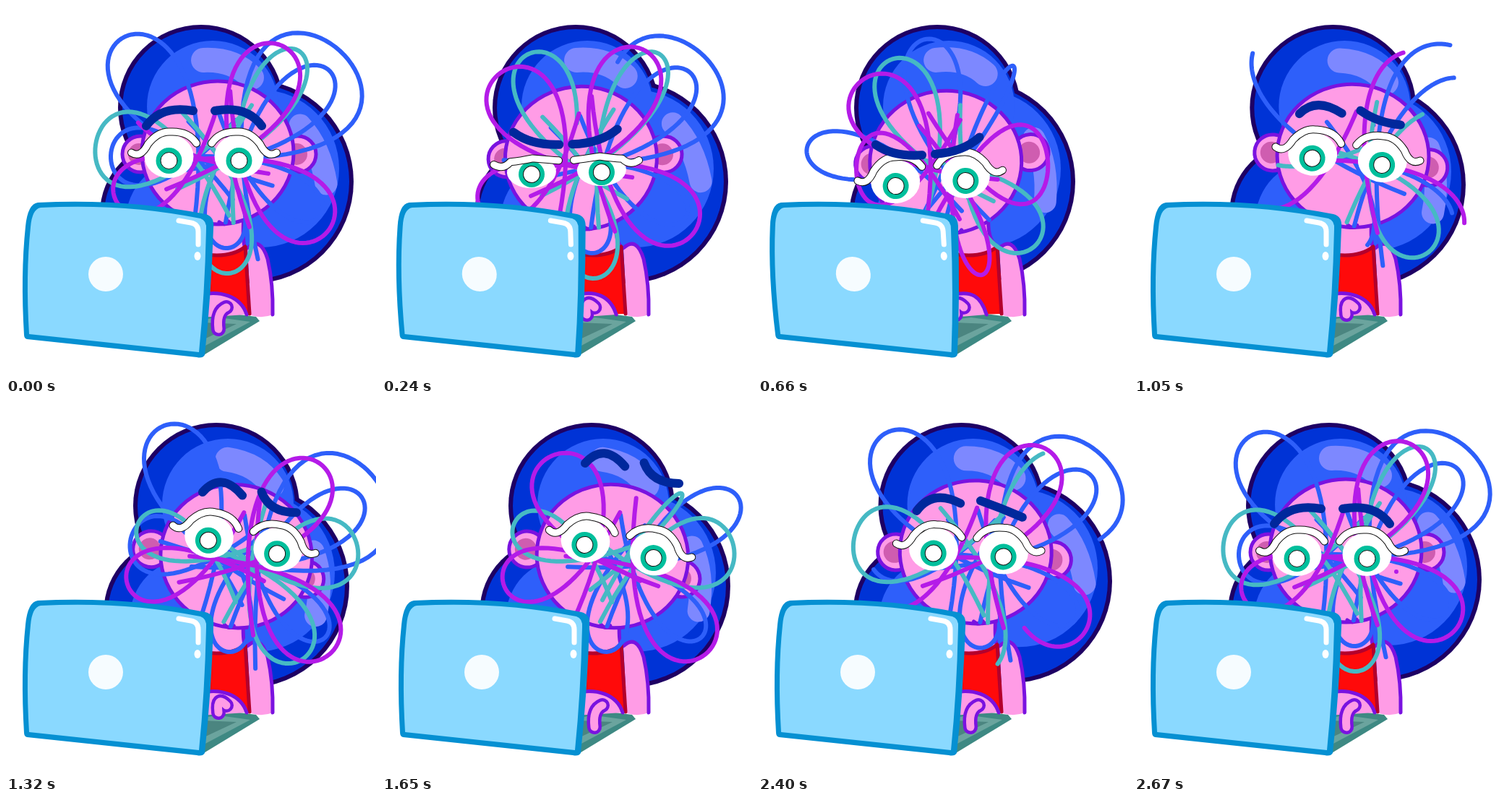
An HTML page with a canvas for the animation above (2700 ms loop, 512 by 512 pixels).

```html
<!DOCTYPE html>
<html lang="en">
<head>
<meta charset="utf-8">
<title>Tangled thoughts at the laptop</title>
<style>
  html, body { margin: 0; width: 100%; height: 100%; overflow: hidden; background: #fff; }
  canvas { display: block; width: 512px; height: 512px; }
</style>
</head>
<body>
<canvas id="stage" width="512" height="512"></canvas>
<script>
const ctx = document.getElementById('stage').getContext('2d');
const LOOP = 2700, STEP = 30, TRIM = 130;
const TIMES = [0, 240, 660, 1320, 1650, 2130, 2670];
const BLUE = '#2e5ffa', PURPLE = '#b41be8', TEAL = '#46b9c4';
const INK = '#7a12e0', SKIN = '#ff9ce6', NAVY = '#00289c';

// Monotone cubic through one value per pose; the loop closes on the first pose.
function track(...poses) {
  const v = [...poses, poses[0]];
  const slope = i => (v[i + 1] - v[i]) / (TIMES[i + 1] - TIMES[i]);
  const tangent = i => {
    if (i === 0 || i === v.length - 1) return 0;
    const a = slope(i - 1), b = slope(i);
    return a * b <= 0 ? 0 : 2 * a * b / (a + b);
  };
  return t => {
    if (t >= TIMES[6]) return v[6];
    let i = 0;
    while (t >= TIMES[i + 1]) i++;
    const h = TIMES[i + 1] - TIMES[i], u = (t - TIMES[i]) / h, w = 1 - u;
    return v[i] * (1 + 2 * u) * w * w + tangent(i) * h * u * w * w
      + v[i + 1] * u * u * (3 - 2 * u) - tangent(i + 1) * h * u * u * w;
  };
}

// The gaze leads; the rest of the body follows it.
const motion = {
  x: track(0, -18.5, -35, 53.5, 54, 40),
  y: track(0, 17.5, 31.5, -16, -10, -10),
  turn: track(0, -1.7, -4.2, 11, 10.8, 7),
  bun: track(0, -2, -22, 21, 20, 23),
  mane: track(0, -2, -42, -6, 1, 18),
  squint: track(0, 1, 0, 0, 0, 0),
  angry: track(0, 1, 1, 0, 0, 0),
  worry: track(0, 0, 0, 1, 1, 1),
  lift: track(0, 0, 0, 0, 47, 5),
  tap: track(1, 0, 0, 0, 1, 1)
};
function poseAt(t) {
  const p = { t };
  for (const key in motion) p[key] = motion[key](t);
  p.headX = 293 + p.x * (p.x < 0 ? 0.95 : 0.48);
  p.headY = 203 + 0.42 * Math.max(0, p.y) + 0.7 * Math.max(0, p.turn);
  p.lean = 0.32 * Math.min(0, p.x);
  return p;
}

function paint(path, fill, stroke, width = 5) {
  const p = typeof path === 'string' ? new Path2D(path) : path;
  if (fill) { ctx.fillStyle = fill; ctx.fill(p); }
  if (stroke) { ctx.strokeStyle = stroke; ctx.lineWidth = width; ctx.stroke(p); }
}
function oval(x, y, rx, ry, ...style) {
  const p = new Path2D();
  p.ellipse(x, y, rx, ry, 0, 0, Math.PI * 2);
  paint(p, ...style);
}
const disc = (x, y, r, ...style) => oval(x, y, r, r, ...style);
function group(x, y, deg, draw) {
  ctx.save();
  ctx.translate(x, y);
  ctx.rotate(deg * Math.PI / 180);
  draw();
  ctx.restore();
}

// A loop of thread: it crosses itself near the middle of the head and bulges out to its tip.
// It is drawn in from its start time and wiped away before its end, which may pass the loop's end.
const loops = [];
const loop = (color, tipX, tipY, width, ...spans) => loops.push({ color, tipX, tipY, width, spans });

loop(BLUE, -133, -158, 48, [2200, 2850], [1000, 1480]);
loop(BLUE, 169, -141, 80, [2300, 3040], [1000, 1580]);
loop(BLUE, 155, -113, 36, [1000, 3120]);
loop(BLUE, -148, 4, 40, [2350, 2880], [1050, 1530]);
loop(BLUE, 14, 132, 28, [1000, 3150]);
loop(BLUE, 142, 87, 28, [1000, 3170]);
loop(BLUE, -190, -34, 32, [450, 980], [1850, 2350]);
loop(BLUE, -14, -172, 38, [440, 930], [1860, 2330]);
loop(BLUE, -100, -119, 25, [1830, 2330]);
loop(BLUE, 103, -126, 10, [480, 940]);

loop(TEAL, -169, -11, 52, [1980, 2860]);
loop(TEAL, 112, -141, 33, [2350, 3100]);
loop(TEAL, 15, 167, 36, [2350, 3110]);
loop(TEAL, -66, -147, 40, [130, 950]);
loop(TEAL, 114, 125, 40, [450, 1580]);
loop(TEAL, 162, -45, 48, [1020, 2330]);
loop(TEAL, -142, -19, 32, [1020, 1820]);
loop(TEAL, 78, -103, 8, [1480, 2320]);

loop(PURPLE, -108, -121, 47, [1480, 1950], [2670, 3640]);
loop(PURPLE, 89, -148, 46, [1880, 3140], [1000, 1500]);
loop(PURPLE, 152, 109, 46, [1000, 1890], [2300, 3160]);
loop(PURPLE, -141, 66, 36, [1000, 1850], [2350, 3150]);
loop(PURPLE, 141, 12, 55, [450, 980], [1870, 2400]);
loop(PURPLE, -124, 0, 50, [450, 980], [1860, 2400]);
loop(PURPLE, 39, 159, 20, [480, 970]);

function drawLoop({ color, tipX, tipY, width }, from, to) {
  const knotX = 0.2 * tipX, knotY = 8;
  const dx = tipX - knotX, dy = tipY - knotY, reach = Math.hypot(dx, dy);
  ctx.beginPath();
  for (let i = 0; i <= 60; i++) {
    const s = 1.2 * (2 * (from + (to - from) * i / 60) - 1);
    const out = 1 - s * s, across = width * (s - s ** 3) / 0.385 / reach;
    ctx.lineTo(knotX + dx * out - dy * across, knotY + dy * out + dx * across);
  }
  ctx.strokeStyle = color;
  ctx.lineWidth = 6;
  ctx.stroke();
}

function drawTangle(p) {
  group(p.headX, p.headY, p.turn, () => {
    for (const l of loops) {
      for (const [begin, end] of l.spans) {
        const age = (p.t - begin + LOOP) % LOOP, left = end - begin - age;
        if (left > 0) drawLoop(l, Math.max(0, 1 - left / TRIM), Math.min(1, age / TRIM));
      }
    }
  });
}

function drawHair(p) {
  const bx = 270 + p.bun, by = 141;
  const mx = 340 + p.mane, my = 243 + 0.8 * Math.max(0, p.turn);
  const blobs = [[230 + 0.1 * p.x, 287, 100], [mx, my, 141], [bx, by, 115]];
  for (const [x, y, r] of blobs) disc(x, y, r, '#1e0064');
  for (const [x, y, r] of blobs) disc(x, y, r - 6, '#0033d6');
  disc(blobs[0][0] + 20, 297, 84, BLUE);
  disc(mx + 12, my - 18, 109, BLUE);
  disc(bx + 16, by - 2, 91, BLUE);
  group(bx, by, p.turn, () => paint('M3-66Q45-68 70-42', null, '#7d88ff', 34));
  group(mx, my, 1.7 * p.turn - 0.5 * p.mane, () => paint('M67-78Q95-48 103 3', null, '#7d88ff', 31));
}

function drawBody(p) {
  const nape = 329 + 0.9 * p.lean;
  paint(`M270 290L${nape} 290Q${nape - 2} 322 331 334L310 352 270 345Z`, SKIN);
  paint(`M${nape} 290Q${nape - 2} 322 330 332`, null, INK);
  const arm = 'M334 335Q352 318 362 350Q370 385 369 427';
  paint(arm + 'Q355 433 339 428Z', SKIN);
  paint(arm, null, INK);
  const shirt = 'M270 343Q310 350 331 333Q334 380 337 426';
  paint(shirt + 'L270 428Z', '#ff0a0a');
  paint(shirt, null, '#b4002c');
}

function drawHead(p) {
  group(p.headX, p.headY, p.turn, () => {
    for (const side of [-1, 1]) {
      const x = 2 + 109 * side - 0.2 * p.x, y = 2 + 0.2 * p.x;
      disc(x, y, 25, SKIN, INK);
      disc(x - 2, y, 15, '#cf5db0');
    }
    oval(0, 0, 105, 99, SKIN, INK);
    paint('M2 96Q10 102 15 95', null, INK);
  });
}

const mix = (a, b, k) => a.map((v, i) => v + (b[i] - v) * k);
const mirror = shape => shape.map((v, i) => i % 2 ? v : -v);
const quad = ([ax, ay, cx, cy, bx, by]) => `M${ax} ${ay}Q${cx} ${cy} ${bx} ${by}`;
const CALM = [-80, -48, -59, -77, -15, -69];
const ANGRY = [-72, -59, -48, -40, -9, -40];
const ARCHED = [-69, -64, -49, -98, -14, -70];
const CUPPED = [11, -80, 27, -54, 64, -61];

function drawEyes(p) {
  const k = p.squint, top = -49 + 22 * k, edge = -11 - 4 * k;
  const lash = `M-52 ${edge}Q-39 ${edge + 8} -29 ${-23 + 5 * k}Q-15 ${top + 8} 2 ${-40 + 18 * k}Q27 ${top + 8} 38 ${-24 + 6 * k}`;
  group(274 + p.x, 214 + p.y, p.turn, () => {
    for (const flip of [1, -1]) {
      ctx.save();
      ctx.scale(flip, 1);
      ctx.translate(-48.5, 0);
      oval(0, -6 + 3 * k, 34, 30 - 8 * k, '#fff');
      disc(0, 0, 18, '#00bf9c');
      disc(0, 0, 11.5, '#fff', '#111', 1);
      paint(lash, null, '#111', 11);
      paint(lash, null, '#fff', 9);
      ctx.restore();
    }
    ctx.translate(0, -p.lift);
    const frown = mix(CALM, ANGRY, p.angry);
    paint(quad(mix(frown, ARCHED, p.worry)), null, NAVY, 12);
    // The right brow runs from the nose outwards once mirrored and reversed.
    const [ax, ay, cx, cy, bx, by] = mirror(frown);
    paint(quad(mix([bx, by, cx, cy, ax, ay], CUPPED, p.worry)), null, NAVY, 12);
  });
}

function drawDesk(p) {
  paint('M272 484L351 436 346 430 300 424 270 428Z', '#3e8983');
  paint('M272 472L338 437 295 431 270 434Z', '#6ba49e');
  paint('M272 462L319 440 272 438Z', '#4b8580');

  const end = 333 + 1.5 * p.lean, fx = 294 + 1.8 * p.lean, fy = 427 + 20 * p.tap;
  const palm = `M268 400C295 393 ${end - 8} 401 ${end} 427`;
  paint(palm + 'L268 431Z', SKIN);
  paint(palm, null, INK);
  const finger = `M${fx} ${fy}Q${fx - 3} ${fy - 24} ${fx + 11} 417`;
  paint(finger, null, INK, 20);
  paint(finger, null, SKIN, 11);

  // The screen pivots on its lower edge.
  ctx.save();
  ctx.transform(1, 0, -p.lean / 180, 1, p.lean * 470 / 180, 0);
  paint('M25 455Q20 372 27 305Q30 274 44 272Q165 266 276 288Q289 291 287 308Q284 400 275 483Q272 488 264 486L29 461Q25 460 25 455Z', '#0590d2');
  paint('M32 454Q27 372 34 306Q36 281 48 279Q165 273 269 294Q278 297 277 309Q275 400 267 479L32 454Z', '#8ad9ff');
  paint('M239 297L256 300Q266 302 266 312V330', null, '#fff', 7);
  oval(265, 346, 4.5, 6, '#fff');
  disc(138, 371, 24, '#f6fcff');
  ctx.restore();
}

function draw(now) {
  const p = poseAt(Math.floor(now % LOOP / STEP) * STEP);
  ctx.fillStyle = '#fff';
  ctx.fillRect(0, 0, 512, 512);
  ctx.lineCap = ctx.lineJoin = 'round';
  for (const layer of [drawHair, drawBody, drawHead, drawTangle, drawEyes, drawDesk]) layer(p);
}

let begin;
function tick(now) {
  begin ??= now;
  draw(now - begin);
  requestAnimationFrame(tick);
}
draw(0);
requestAnimationFrame(tick);
</script>
</body>
</html>
```
